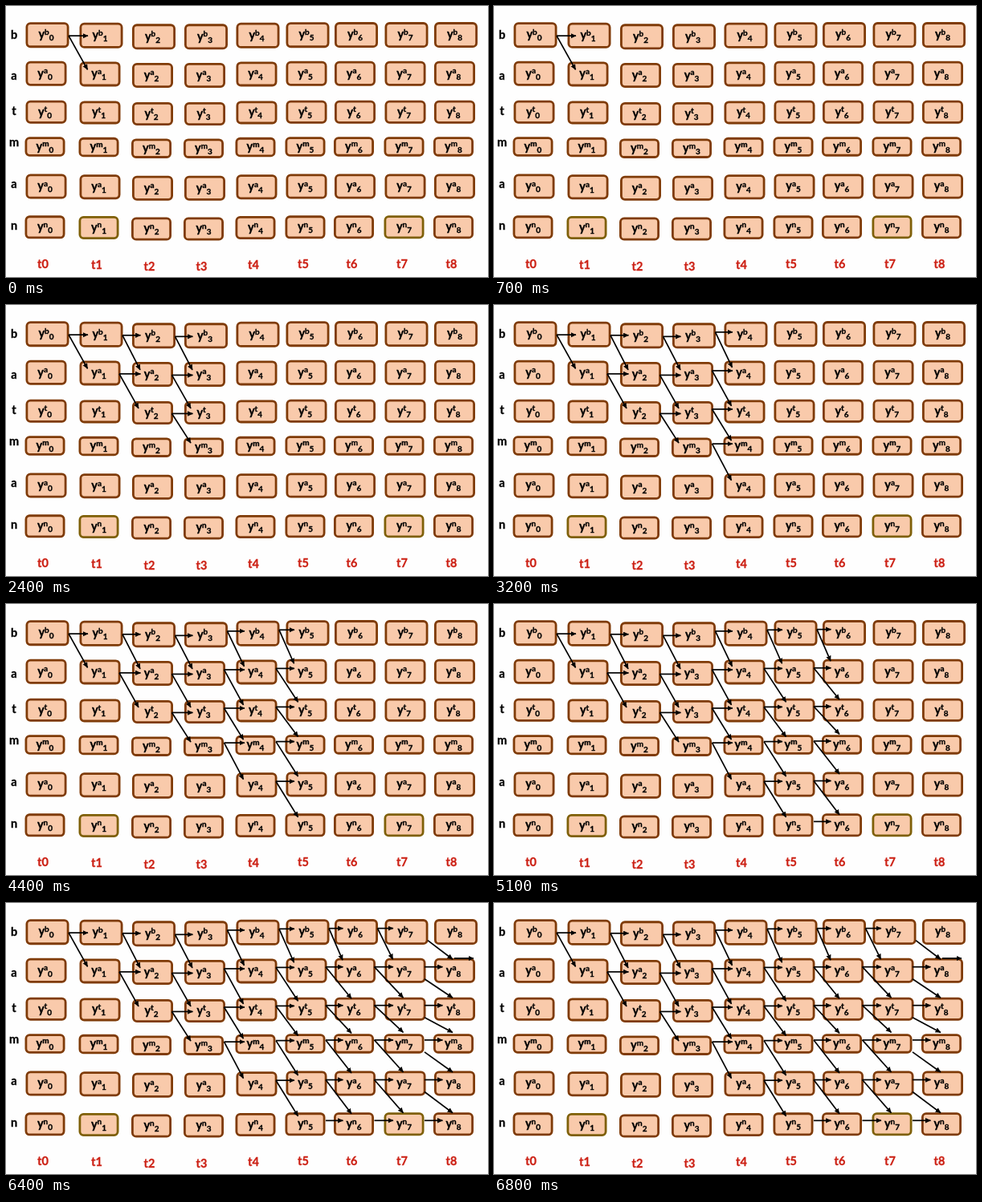
An HTML page that plays this animation: 600x338 px, repeating every 6900 ms.

```html
<!DOCTYPE html>
<html lang="en">
<head>
<meta charset="utf-8">
<title>Alignment lattice</title>
<style>
html, body { margin: 0; width: 100%; height: 100%; overflow: hidden; background: #fefefe; }
svg { display: block; width: 100vw; height: 100vh; }
text { font: bold 14.5px Lato, Carlito, sans-serif; text-anchor: middle; stroke: #000; stroke-width: 0.3; }
.time { fill: #cc2014; stroke: #cc2014; }
.small { font-size: 10px; }
rect { fill: #f9caab; stroke: #7f3b08; stroke-width: 2.8; }
.olive { stroke: #7f6008; }
line { stroke: #000; stroke-width: 1.7; marker-end: url(#head); }
</style>
</head>
<body>
<svg id="stage" viewBox="0 0 600 338">
  <defs>
    <marker id="head" markerUnits="userSpaceOnUse" markerWidth="8" markerHeight="8"
            refX="6.5" refY="3.2" orient="auto"><path d="M0 0L7 3.2L0 6.4Z"/></marker>
  </defs>
</svg>
<script>
const LOOP = 6900, STEP = 900, LAST = 8;
const stage = document.getElementById('stage');

const rows = [
  { letter: 'b', y: 35.7, w: 54, h: 32, labelY: 41 },
  { letter: 'a', y: 83.8, w: 51, h: 31, labelY: 92 },
  { letter: 't', y: 131.8, w: 51, h: 29, labelY: 136 },
  { letter: 'm', y: 175, w: 50, h: 24.5, labelY: 175 },
  { letter: 'a', y: 224.6, w: 51, h: 31, labelY: 227 },
  { letter: 'n', y: 275.4, w: 50, h: 29, labelY: 279 }
];
const lefts = [24.5, 91.5, 157, 222, 286.5, 348.5, 409, 471.5, 533];

// the columns sag a little around t2 and t3
const sag = c => 0.4 + 2.6 * Math.exp(-(((c - 2.5) / 1.3) ** 2));
const midY = (r, c) => rows[r].y + sag(c);
const clamp = (v, lo, hi) => Math.min(hi, Math.max(lo, v));

function add(parent, tag, attrs, text) {
  const el = document.createElementNS('http://www.w3.org/2000/svg', tag);
  for (const key in attrs) el.setAttribute(key, attrs[key]);
  if (text !== undefined) el.textContent = text;
  return parent.appendChild(el);
}

const arrow = (g, x1, y1, x2, y2) => add(g, 'line', { x1, y1, x2, y2 });

function drawCell(r, c) {
  const { letter, w, h } = rows[r], y = midY(r, c), edge = 1.4;
  const x = lefts[c] - (w === 50 ? 1 : 0);
  const olive = letter === 'n' && c % 6 === 1;
  add(stage, 'rect', {
    x: x + edge, y: y - h / 2 + edge, width: w - 2 * edge, height: h - 2 * edge,
    rx: 4.5, class: olive ? 'olive' : ''
  });
  const label = add(stage, 'text', { x: lefts[c] + (r ? 24 : 25.5), y: y + 4.3 });
  add(label, 'tspan', {}, 'y');
  add(label, 'tspan', { class: 'small', dy: -4.3 }, letter);
  add(label, 'tspan', { class: 'small', dy: 7.3 }, c);
}

// arrows from column k-1 to column k: one level and one slanted per reached row
function drawStep(k) {
  const g = add(stage, 'g', {}), last = k === LAST;
  for (let r = 0; r < Math.min(k, rows.length); r++) {
    const x = lefts[k - 1] + (r ? 49.5 : 53.5);
    const mid = midY(r, k - 1), level = mid + (k < 4 ? 1 : -4.5);
    if (last && !r) arrow(g, 558, 69, 582, 69);
    else arrow(g, x, level, lefts[k] + 10.5, level);
    if (r + 1 === rows.length) break;
    const reach = r || last ? clamp(6 * k - 15, 8, 23) : 10;
    const rise = clamp(3 * k - 5, 5.5, 14);
    arrow(g, x, last ? mid + 10.5 : level, lefts[k] + reach, midY(r + 1, k) - rise);
  }
  return g;
}

rows.forEach(({ letter, labelY }, r) => {
  add(stage, 'text', { x: 10, y: labelY }, letter);
  lefts.forEach((_, c) => drawCell(r, c));
});
lefts.forEach((x, c) =>
  add(stage, 'text', { class: 'time', x: x + 21.5, y: 327 + sag(c) }, 't' + c));

const groups = lefts.slice(1).map((_, i) => drawStep(i + 1));

function frame() {
  const step = Math.floor(performance.now() % LOOP / STEP);
  groups.forEach((g, i) => g.setAttribute('visibility', i <= step ? 'visible' : 'hidden'));
  requestAnimationFrame(frame);
}
frame();
</script>
</body>
</html>
```
